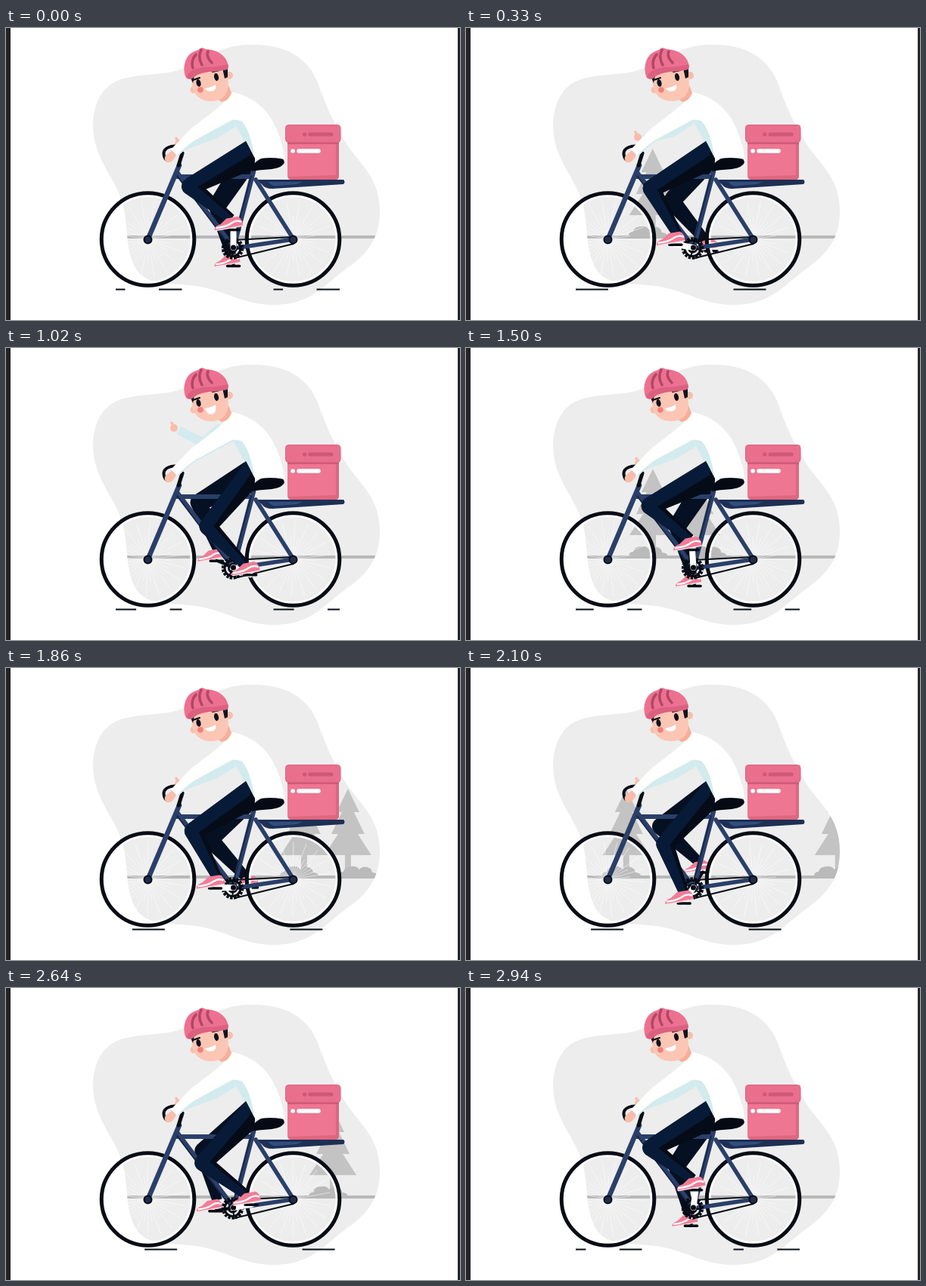
An HTML page that plays this animation: 600x387 px, repeating every 2.97 s.

```html
<!DOCTYPE html>
<html lang="en">
<head>
<meta charset="utf-8">
<title>Bike delivery</title>
<style>
html, body { margin: 0; width: 100%; height: 100%; overflow: hidden; background: #fff; }
svg { display: block; width: 600px; height: 387px; }
.tube { fill: none; stroke: #2a3f69; stroke-linecap: round; stroke-linejoin: round; }
.ink { fill: none; stroke: #080c14; stroke-linecap: round; stroke-linejoin: round; }
</style>
</head>
<body>
<svg viewBox="0 0 600 387">
  <defs>
    <path id="blob" d="M115 130C115 101 127 76 152 68C185 58 211 65 240 51C269 37 287 22 326 22C371 22 398 40 411 70C423 103 434 130 453 158C472 184 494 202 494 242C494 285 472 303 446 322C420 341 404 365 358 367C313 368 291 347 251 342C216 337 181 344 168 312C157 286 162 257 153 229C143 196 116 174 115 130Z"/>
    <clipPath id="land"><use href="#blob"/></clipPath>
    <path id="tree" d="M0 160L15 191H8L22 220H13L31 248H4V277H-4V248H-31L-13 220H-22L-8 191H-15Z" fill="#c3c3c3"/>
    <path id="bush" d="M-26 277Q-26 270 -20 270Q-18 263 -9 263Q-3 262 1 267Q5 262 12 264Q18 266 18 271Q25 271 26 277Z" fill="#bababa"/>
    <g id="shoe" transform="translate(0 -3) rotate(-10)">
      <path d="M-25 0Q-26 -5 -16 -7L-7 -13H8Q14 -9 13 0Z" fill="#f27c96"/>
      <path d="M-23 -3Q-8 -2 -1 -6Q6 -9 12 -5" fill="none" stroke="#fff" stroke-width="2.4"/>
      <path d="M-24 .3H13" stroke="#f9dce2" stroke-width="1.5"/>
    </g>
  </defs>

  <rect width="600" height="387" fill="#fff"/>
  <use href="#blob" fill="#ededed"/>
  <g clip-path="url(#land)">
    <path d="M158 277H488" stroke="#b8b8b8" stroke-width="4"/>
    <g id="lone"><use href="#tree"/><use href="#bush" x="-6"/></g>
    <g id="pair"><use href="#tree"/><use href="#tree" x="58"/><use href="#bush" x="-6"/><use href="#bush" x="72"/></g>
    <g id="last"><use href="#tree"/><use href="#bush" x="-6"/></g>
  </g>
  <path id="dashes" class="ink" stroke-width="2" style="stroke-linecap:butt"/>

  <path id="farArm" fill="none" stroke="#d3ebee" stroke-width="12" stroke-linejoin="round"/>
  <g id="farHand" fill="#f9bda9">
    <circle r="5"/>
    <path d="M-3 -2L-5 -8Q-2 -10 0 -5L3 -2Z"/>
  </g>

  <path id="farCrank" class="ink" stroke-width="4"/>
  <path id="farLeg" fill="#051022"/>
  <use id="farShoe" href="#shoe"/>
  <path id="farPedal" class="ink" stroke-width="3.5"/>

  <g id="wheels"></g>

  <path d="M330 201H446Q449 204 446 207L352 213Q342 213 338 207Z" fill="#1d2f55"/>
  <path d="M347 204H392L384 207L356 209.500Q350 209 347 204Z" fill="#344d7a"/>
  <g class="tube">
    <path d="M330 201L380 280" stroke-width="5.500"/>
    <path d="M380 280L301 292" stroke-width="5.500"/>
    <path d="M226 197H323" stroke-width="6"/>
    <path d="M227 193L300 290M327 190L301 290" stroke-width="6.500"/>
    <path d="M229 182L187.500 280" stroke-width="6.500"/>
    <path d="M226 196L297 290M324 196L299 290" stroke="#16243f" stroke-width="1.500"/>
  </g>
  <g class="ink">
    <path d="M300 281L379 277M302 305L380 286" stroke-width="2"/>
    <path d="M233 166L228 182" stroke-width="5"/>
    <path d="M231 158C219 154 208 159 208.500 167Q209 174 214 176" stroke-width="4"/>
  </g>
  <circle cx="187.500" cy="280.500" r="5" fill="#1d2e50" stroke="#080c14" stroke-width="2"/>
  <circle cx="379.500" cy="280.500" r="5" fill="#1d2e50" stroke="#080c14" stroke-width="2"/>
  <g id="ring" fill="none" stroke="#080c14">
    <circle r="13" stroke-width="3.500" stroke-dasharray="3.4 1.7"/>
    <circle r="10.500" stroke-width="3"/>
    <circle r="5" stroke-width="3"/>
    <path d="M-10 0H10M0 -10V10" stroke-width="2"/>
  </g>
  <path id="nearCrank" fill="none" stroke="#fff" stroke-width="8" stroke-linecap="round"/>
  <circle cx="300.500" cy="291" r="3.500" fill="#080c14"/>
  <path id="nearPedal" class="ink" stroke-width="3.5"/>

  <path d="M325 186C328 177 336 171 350 171H362Q370 175 367 180C360 189 346 186 325 190Z" fill="#050a14"/>
  <path d="M288 97L300 85C327 91 348 109 358 135Q367 156 368 174Q350 170 330 174L316 152L299 121Z" fill="#fff"/>
  <path d="M299 121L311 123Q324 137 328 172L320 160Z" fill="#d3ebee"/>
  <path id="nearLeg" fill="#050c18"/>
  <path id="nearTone" fill="#071b38"/>
  <use id="nearShoe" href="#shoe"/>

  <path d="M215 166L224 158Q228 158 227 163L223 172Q217 181 211 177Q207 170 215 166Z" fill="#f9bda9"/>
  <path d="M290 97C278 108 262 120 246 132Q232 146 218 161L226 169Q238 157 250 149L302 122Q316 112 306 99Z" fill="#fff"/>
  <path d="M227 169Q239 157 251 149L301 122" fill="none" stroke="#d3ebee" stroke-width="2"/>

  <g id="head">
    <path d="M279 94L294 76L298 86Q294 97 285 98Z" fill="#f6b09c"/>
    <circle cx="295" cy="63" r="5" fill="#f9bda9"/>
    <circle cx="248" cy="82" r="4.500" fill="#f9bda9"/>
    <path d="M244 61Q266 47 293 52L294 78Q290 97 271 97Q253 97 247 81Z" fill="#fbc7b4"/>
    <path d="M286 53L293 54L293 65L289 67Z M243 64L249 63L247 73Z" fill="#10131d"/>
    <ellipse cx="254.500" cy="73" rx="3" ry="5" transform="rotate(-12 254 73)" fill="#10131d"/>
    <ellipse cx="278" cy="65" rx="3" ry="5" transform="rotate(-12 278 65)" fill="#10131d"/>
    <path d="M247 69L256 66M273 58L282 56" class="ink" stroke-width="2"/>
    <circle cx="257" cy="82" r="3.800" fill="#f47f7d"/>
    <path id="mouth" fill="#fff"/>
    <path d="M238 66Q234 58 236 48Q239 33 254 29Q258 24 264 28Q283 29 291 42Q296 52 292 55Q280 58 268 58Q252 60 246 67Q241 69 238 66Z" fill="#ec7190"/>
    <path d="M238 64Q243 54 262 52Q278 52 293 48Q295 53 292 55Q280 58 268 58Q252 60 246 67Q241 69 238 64Z" fill="#dc6081"/>
    <path d="M247 53Q244 43 251 35M259 49Q253 38 258 29M272 46Q264 38 267 31" fill="none" stroke="#b24766" stroke-width="3.500" stroke-linecap="round"/>
  </g>

  <path d="M372 149H440V196Q440 201 435 201H377Q372 201 372 196Z" fill="#ee7692"/>
  <path d="M373 197Q374 201 378 201H435Q440 201 440 196V150H436V195Z" fill="#e0667f"/>
  <path d="M372 151H440V154H372Z" fill="#d05a7a"/>
  <rect x="369.500" y="128.500" width="72.500" height="23" rx="4" fill="#e96f8d" stroke="#dc6080"/>
  <g stroke-linecap="round">
    <path d="M402 141H430M394.500 141H395" stroke="#cd5877" stroke-width="5"/>
    <path d="M387 163H413M379 163H379.200" stroke="#fff" stroke-width="5.500"/>
  </g>
  <rect width="6" height="387" fill="#242424"/>
  <rect x="597" width="3" height="387" fill="#242424"/>
</svg>
<script>
const LOOP = 2970, STEP = 30;
const CRANK = { x: 300.5, y: 291, r: 24 };
const WAIST = { x: 317, y: 150 }, SEAT = { x: 328, y: 187 };
const WINDOW = 87.5, DASH = 43, DASH_PERIOD = 244.8;
const SCENERY_SPEED = 0.408;
const byId = id => document.getElementById(id);
const set = (id, name, value) => byId(id).setAttribute(name, value);
const place = (id, x, y, rest = '') => set(id, 'transform', `translate(${x} ${y}) ${rest}`);
const mix = (a, b, k) => a + (b - a) * k;
const ease = (t, from, to) => {
  const k = Math.min(1, Math.max(0, (t - from) / (to - from)));
  return k * k * (3 - 2 * k);
};

byId('wheels').innerHTML = [187.5, 379.5].map((x, i) => {
  let spokes = '';
  for (let k = 0; k < 36; k++) {
    const a = k * Math.PI / 18, r = k % 2 ? 30 : 50;
    spokes += `M0 0L${r * Math.cos(a)} ${r * Math.sin(a)}`;
  }
  return `<g transform="translate(${x} 280)">
    <path id="spokes${i}" d="${spokes}" stroke="#fff" stroke-width=".8" opacity=".6"/>
    <circle r="57.5" fill="none" stroke="#fff" stroke-width="3"/>
    <circle r="61.3" fill="none" stroke="#080c14" stroke-width="5"/></g>`;
}).join('');

// Point beside p, r away from the line a-b, on its forward side.
function beside(a, b, p, r) {
  const d = Math.hypot(b.x - a.x, b.y - a.y);
  return { x: p.x + r * (a.y - b.y) / d, y: p.y + r * (b.x - a.x) / d };
}

function knee(hip, ankle, thigh, shin) {
  const dx = ankle.x - hip.x, dy = ankle.y - hip.y;
  const d = Math.min(Math.hypot(dx, dy), thigh + shin - 0.1);
  const bend = Math.acos((thigh * thigh + d * d - shin * shin) / (2 * thigh * d));
  const a = Math.atan2(dy, dx) + bend;
  return { x: hip.x + thigh * Math.cos(a), y: hip.y + thigh * Math.sin(a) };
}

// Trouser leg; back < 1 pulls the rear edge in.
function trouser(hip, joint, ankle, back) {
  const R = 11.5, r = 6.5;
  const seat = { x: mix(WAIST.x, SEAT.x, back), y: mix(WAIST.y, SEAT.y, back) };
  const at = p => `${p.x} ${p.y}`;
  const thigh = q => at(beside(hip, joint, joint, q));
  const shin = (p, q) => at(beside(joint, ankle, p, q));
  return `M${at(WAIST)}L${thigh(R)}A${R} ${R} 0 0 0 ${shin(joint, R)}L${shin(ankle, r)}` +
    `L${shin(ankle, -r * back)}L${shin(joint, -R * back)}L${thigh(-R * back)}L${at(seat)}L${mix(WAIST.x, 329, back)} ${mix(WAIST.y, 173, back)}Z`;
}

function drawLeg(side, angle, hip, thigh, shin, shoeScale) {
  const dx = -CRANK.r * Math.sin(angle);
  const pedal = { x: CRANK.x + dx, y: CRANK.y - CRANK.r * Math.cos(angle) };
  const ankle = { x: pedal.x - 3 - dx * 0.22, y: pedal.y - 14 };
  const joint = knee(hip, ankle, thigh, shin);
  set(side + 'Leg', 'd', trouser(hip, joint, ankle, 1));
  if (side === 'near') set('nearTone', 'd', trouser(hip, joint, ankle, 0.5));
  set(side + 'Crank', 'd', `M${CRANK.x} ${CRANK.y}L${pedal.x} ${pedal.y}`);
  set(side + 'Pedal', 'd', `M${pedal.x - 8} ${pedal.y + 0.5}h16`);
  place(side + 'Shoe', pedal.x - 25 * (1 - shoeScale), pedal.y, `scale(${shoeScale})`);
}

function drawDashes(t) {
  const s = ((57 / WINDOW + t / DASH_PERIOD) % 1) * WINDOW;
  let d = '';
  for (const left of [145, 353.5]) {
    d += `M${left + s} 346.5H${left + Math.min(WINDOW, s + DASH)}`;
    if (s + DASH > WINDOW) d += `M${left} 346.5H${left + s + DASH - WINDOW}`;
  }
  set('dashes', 'd', d);
}

function draw(t) {
  const angle = 4 * Math.PI * t / LOOP;
  drawLeg('far', angle + Math.PI, { x: 325, y: 175 }, 76, 68, 0.9);
  drawLeg('near', angle, { x: 317, y: 169 }, 84, 69, 1);
  place('ring', CRANK.x - 1, CRANK.y + 1, `rotate(${-angle * 180 / Math.PI})`);
  for (const i of [0, 1]) set('spokes' + i, 'transform', `rotate(${-t * 0.36})`);
  drawDashes(t);

  place('lone', 112 + SCENERY_SPEED * t, 0);
  place('pair', -365 + SCENERY_SPEED * t, 0);
  place('last', -645 + SCENERY_SPEED * t, 0);

  const wave = ease(t, 210, 660) - ease(t, 1050, 1440);
  const hand = { x: mix(228, 222, wave), y: mix(153, 106, wave) };
  const elbow = { x: mix(276, 261, wave), y: mix(141, 126, wave) };
  set('farArm', 'd', `M${mix(302, 284, wave)} ${mix(125, 104, wave)}L${elbow.x} ${elbow.y}L${hand.x + 6} ${hand.y + 3}`);
  place('farHand', hand.x, hand.y);
  const smile = ease(t, 450, 700) - ease(t, 1080, 1350);
  set('mouth', 'd', `M263 80Q271 79 277 75Q279 ${83 + 4 * smile} 271 ${84 + 4 * smile}Q265 ${84 + 3 * smile} 263 80Z`);
  place('head', ease(t, 150, 330) - ease(t, 450, 700), 0);
}

function tick(now) {
  draw(Math.floor((now % LOOP) / STEP) * STEP);
  requestAnimationFrame(tick);
}
draw(0);
requestAnimationFrame(tick);
</script>
</body>
</html>
```
